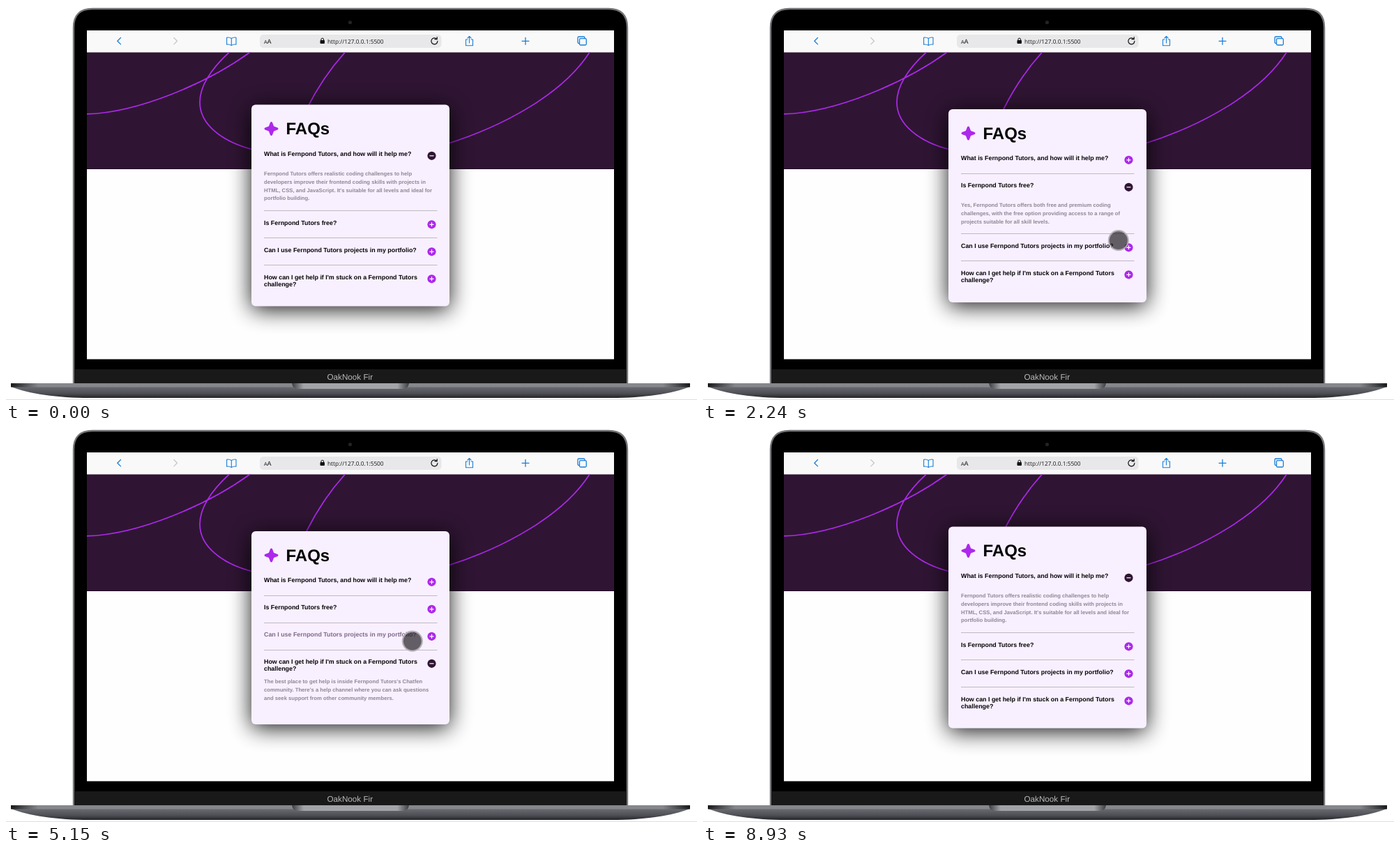
These frames come from a looping animation (991 px wide and 565 px high, 9.26 s). An HTML page:

```html
<!DOCTYPE html>
<html lang="en">
<head>
<meta charset="utf-8">
<title>FAQ accordion</title>
<style>
  html, body { margin: 0; width: 100%; height: 100%; overflow: hidden; background: #fff; }
  svg { display: block; width: 100vw; height: 100vh; }
  text { font-family: "Liberation Sans", Arial, sans-serif; text-rendering: geometricPrecision; }
  #card text { font-weight: bold; }
  .question { font-size: 8.9px; fill: #050306; }
  .question.hover { fill: #7e6a8c; }
  .answer { font-size: 7.7px; fill: #8f8794; }
  .divider { stroke: #bfb9c3; }
  .line { fill: none; stroke: #ad28eb; stroke-width: 1.7; }
  .tool { fill: none; stroke: #1a7dd7; stroke-width: 1.3; stroke-linecap: round; stroke-linejoin: round; }
</style>
</head>
<body>
<svg viewBox="0 0 991 565">
  <defs>
    <filter id="blur" x="-50%" y="-50%" width="200%" height="200%"><feGaussianBlur stdDeviation="16"/></filter>
    <linearGradient id="base" x2="0" y2="1">
      <stop offset="0" stop-color="#85878c"/><stop offset=".3" stop-color="#66686e"/>
      <stop offset=".7" stop-color="#4d4e54"/><stop offset="1" stop-color="#242427"/>
    </linearGradient>
    <linearGradient id="ends">
      <stop offset="0" stop-color="#18181a"/><stop offset=".04" stop-color="#85878c"/>
      <stop offset=".96" stop-color="#85878c"/><stop offset="1" stop-color="#18181a"/>
    </linearGradient>
    <linearGradient id="notch">
      <stop offset="0" stop-color="#3c3d40"/><stop offset=".1" stop-color="#a2a4a8"/>
      <stop offset=".9" stop-color="#a2a4a8"/><stop offset="1" stop-color="#3c3d40"/>
    </linearGradient>
    <clipPath id="banner"><path d="M116 66.5H872V234H116z"/></clipPath>
  </defs>

  <!-- laptop -->
  <path d="M0 564.5H991" stroke="#dedede"/>
  <path d="M97 543V31Q97 4 124 4H864Q891 4 891 31V543z" fill="#000" stroke="#737578" stroke-width="2.4"/>
  <path d="M99 521H889V542H99z" fill="#191919"/>
  <circle cx="493.5" cy="23.5" r="2.6" fill="#232326"/>
  <text x="493.3" y="535.8" font-size="11.7" fill="#b9b9b9" text-anchor="middle">OakNook Fir</text>
  <path d="M7 541H981V546C955 556 915 562 868 562H120C73 562 33 556 7 546z" fill="url(#base)"/>
  <path d="M7 541H981V546.5H7z" fill="url(#ends)"/>
  <path d="M410 541H578Q577 549 569 549H419Q411 549 410 541z" fill="url(#notch)"/>

  <!-- browser -->
  <path d="M116 35H872V506.5H116z" fill="#fefefe"/>
  <path d="M116 35H872V66.5H116z" fill="#f9f9f9"/>
  <rect x="364" y="41" width="260.500" height="19" rx="5" fill="#e8e8ea"/>
  <text x="370" y="53.500" font-size="7" fill="#111">A</text>
  <text x="374.500" y="53.500" font-size="9" fill="#111">A</text>
  <rect x="450.500" y="49" width="6.500" height="5" rx="1" fill="#111"/>
  <path d="M451.900 49.500V48a1.850 1.850 0 0 1 3.700 0V49.500" fill="none" stroke="#111"/>
  <text x="461" y="53.500" font-size="8.300" fill="#151515" style="font-family:'Open Sans',sans-serif">http://127.0.0.1:5500</text>
  <g class="tool">
    <path d="M164.500 45.500l-4.700 4.700 4.700 4.700"/>
    <path d="M240.800 45.500l4.700 4.700-4.700 4.700" stroke="#c8c8ca"/>
    <path d="M323.300 46.500q-3-2-6.700-1.300v10q3.700-.6 6.700 1.300q3-1.900 6.700-1.300v-10q-3.700-.7-6.700 1.300zv9.800" stroke-width="1.100"/>
    <path d="M662 48h-2.500v8.800h10V48H667M664.500 53V43.500M662 46l2.500-2.500 2.500 2.500" stroke-width="1.100"/>
    <path d="M740 50.300h10M745 45.300v10"/>
    <path d="M822.500 53.500h-1q-1.500 0-1.500-1.500v-6.500q0-1.500 1.500-1.500h7q1.500 0 1.500 1.500v1"/>
    <rect x="822.500" y="46.700" width="9.800" height="9.300" rx="1.500"/>
    <path d="M617.700 47.300a4.500 4.500 0 1 0 1.200 3M618.200 44.500v3.200h-3.200" stroke="#111" stroke-width="1.200"/>
  </g>
  <g clip-path="url(#banner)">
    <path d="M116 66H872V234H116z" fill="#2f1533"/>
    <path class="line" d="M115 155C190 153 290 110 351 65.500M321 65.500C292 92 278 115 278 138C278 170 310 195 356 206.500M487 65.500C463 92 446 118 431 148L420 175M837.500 65.500C800 125 715 172 630 198.500"/>
    <path d="M116 233.500H872" stroke="#230d27"/>
  </g>

  <g id="card"></g>
  <g id="pointer">
    <circle r="13.800" fill="#1a171b" fill-opacity=".67"/>
    <circle r="14" fill="none" stroke="#b4afb5" stroke-opacity=".9" stroke-width="2.200"/>
    <circle id="press" r="8.700" fill="#aaa935"/>
  </g>
</svg>
<script>
const LOOP = 9260;
const faqs = [
  [["What is Fernpond Tutors, and how will it help me?"],
   ["Fernpond Tutors offers realistic coding challenges to help",
    "developers improve their frontend coding skills with projects in",
    "HTML, CSS, and JavaScript. It's suitable for all levels and ideal for",
    "portfolio building."]],
  [["Is Fernpond Tutors free?"],
   ["Yes, Fernpond Tutors offers both free and premium coding",
    "challenges, with the free option providing access to a range of",
    "projects suitable for all skill levels."]],
  [["Can I use Fernpond Tutors projects in my portfolio?"],
   ["Yes, you can use projects completed on Fernpond Tutors in your",
    "portfolio. It's an excellent way to showcase your skills to potential",
    "employers!"]],
  [["How can I get help if I'm stuck on a Fernpond Tutors", "challenge?"],
   ["The best place to get help is inside Fernpond Tutors's Chatfen",
    "community. There's a help channel where you can ask questions",
    "and seek support from other community members."]]
];

// [time, open item]
const openings = [[0, 0], [1630, 1], [3110, 2], [4310, 3], [5610, 2], [6680, 1], [7760, 0]];
// [press, release]
const presses = [[1560, 1630], [3040, 3110], [4250, 4310], [5480, 5610], [6610, 6680], [7560, 7760]];
// [time, x, y]
const path = [
  [190, 904, 519], [1070, 611, 336], [1420, 598, 312], [1630, 598, 312], [1830, 598, 316],
  [2000, 598, 316], [2370, 595, 344], [3300, 595, 344], [3370, 593, 353], [3720, 595, 388],
  [4390, 595, 388], [4450, 595, 386], [5280, 582, 300], [5740, 582, 300], [6070, 573, 280],
  [6340, 573, 264], [6680, 573, 264], [7420, 574, 223.5], [7560, 574, 221.5], [7690, 574, 221.5],
  [8600, 944, 526], [8720, 965, 542], [8930, 968, 550]
];

const byId = id => document.getElementById(id);
const label = (kind, x, y, text) => `<text class="${kind}" x="${x}" y="${y}">${text}</text>`;

function pointerAt(t) {
  const i = Math.max(1, path.findIndex(p => p[0] > t));
  const [t0, x0, y0] = path[i - 1], [t1, x1, y1] = path[i];
  const u = Math.min(1, Math.max(0, (t - t0) / (t1 - t0)));
  const s = u * u * (3 - 2 * u);
  return [x0 + (x1 - x0) * s, y0 + (y1 - y0) * s];
}

const pointerShown = t => t >= 190 && t < 8650 || t >= 8720 && t < 8930;

function toggleIcon(y, open) {
  return `<circle cx="610.5" cy="${y}" r="6.1" fill="${open ? "#2f1533" : "#ad28eb"}"/>
    <path d="M607.5 ${y}h6${open ? "" : "m-3-3v6"}" stroke="#fff" stroke-width="1.2"/>`;
}

// Vertical centre of each question's first line
function questionRows(open) {
  let y = open === 0 ? 212 : 218;
  return faqs.map(([, answer], i) => {
    const row = y;
    y += 39 + (i === open ? 12 * answer.length + 11.5 : 0);
    return row;
  });
}

function cardMarkup(open, rows, hovered) {
  const top = open === 0 ? 141.5 : 148, height = open === 0 ? 289 : 277;
  const box = `x="352" width="284" height="${height}" rx="6"`;
  let out = `<rect ${box} y="${top + 5}" opacity=".9" filter="url(#blur)"/>
    <rect ${box} y="${top}" fill="#f8f0ff"/>
    <path transform="translate(380.5 ${top + 34.5})" fill="#ad28eb"
      d="M-1.5-9Q0-11 1.5-9L3.6-3.600L9-1.500Q11 0 9 1.500L3.600 3.600L1.500 9Q0 11-1.500 9L-3.600 3.600L-9 1.500Q-11 0-9-1.500L-3.600-3.600z"/>
    <text x="401.5" y="${top + 42.5}" font-size="24">FAQs</text>`;
  faqs.forEach(([question, answer], i) => {
    const y = rows[i], kind = i === hovered ? "question hover" : "question";
    if (i) out += `<path class="divider" d="M370 ${Math.floor(y - 17) + .5}H618.500"/>`;
    question.forEach((line, k) => out += label(kind, 370, y + 3.2 + 10 * k, line));
    if (i === open) answer.forEach((line, k) => out += label("answer", 370, y + 30.7 + 11.9 * k, line));
    out += toggleIcon(y + 2.8, i === open);
  });
  return out;
}

let shownKey = "";
function draw(t) {
  const open = openings.filter(o => o[0] <= t).pop()[1];
  const rows = questionRows(open);
  const visible = pointerShown(t);
  const [x, y] = pointerAt(t);
  const hovered = visible && x > 370 && x < 618 ? rows.findIndex(r => Math.abs(y - r - 2) < 8) : -1;
  const key = open + "/" + hovered;
  if (key !== shownKey) {
    byId("card").innerHTML = cardMarkup(open, rows, hovered);
    shownKey = key;
  }
  const pointer = byId("pointer");
  pointer.setAttribute("transform", `translate(${x} ${y})`);
  pointer.style.display = visible ? "" : "none";
  byId("press").style.display = presses.some(([a, b]) => t >= a && t < b) ? "" : "none";
}

const start = performance.now();
function frame() {
  draw((performance.now() - start) % LOOP);
  requestAnimationFrame(frame);
}
frame();
</script>
</body>
</html>
```
